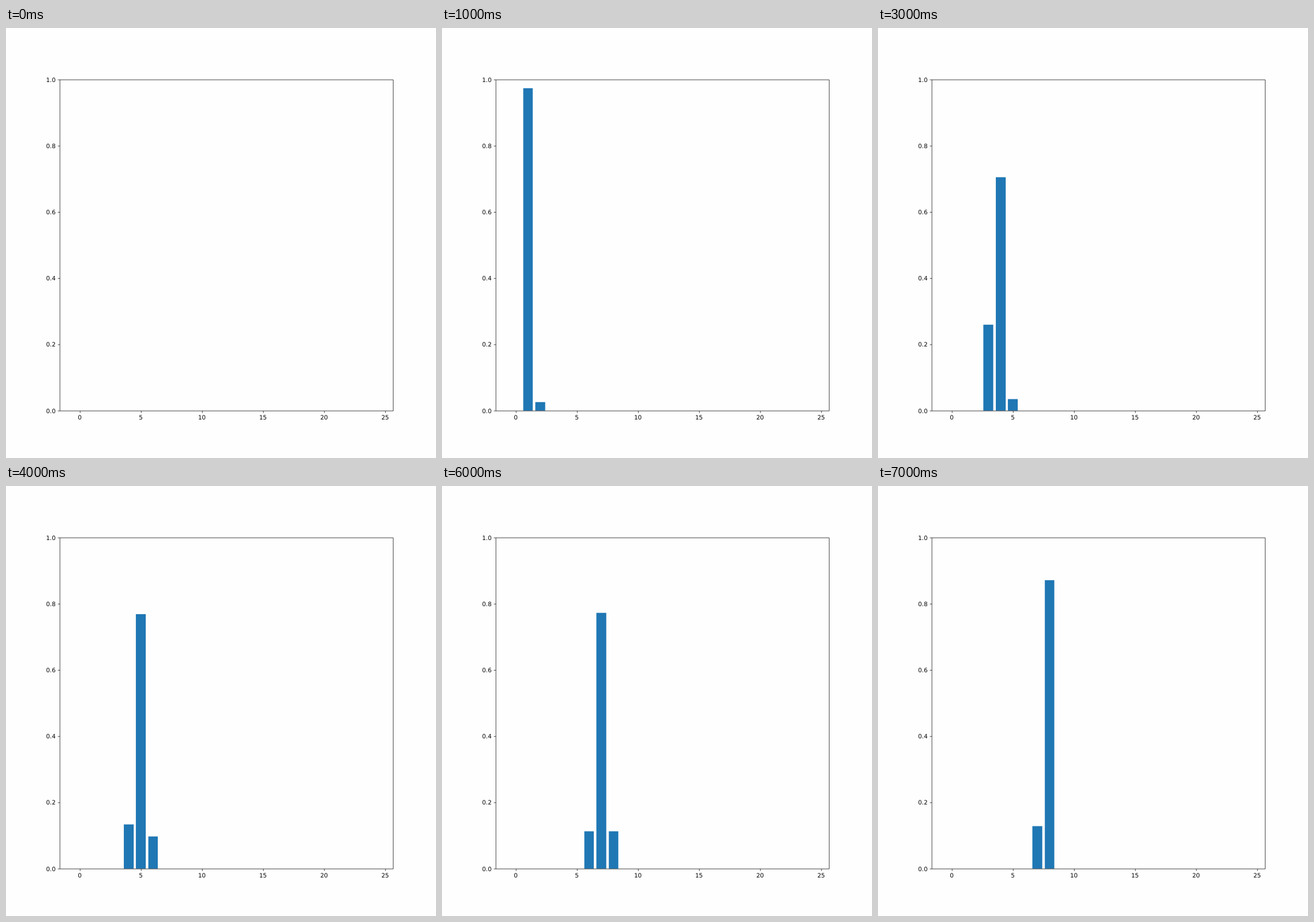
An HTML page for the animation above (8000 ms loop, 748x748 px).

```html
<!DOCTYPE html>
<html lang="en">
<head>
<meta charset="utf-8">
<title>Probability histogram</title>
<style>
  html, body { margin: 0; width: 100%; height: 100%; overflow: hidden; background: #fefefe; }
  svg { display: block; width: 748px; height: 748px; }
  text { font: 13.89px "DejaVu Sans", sans-serif; text-rendering: geometricPrecision; }
  #bars { fill: #1f77b4; }
  #axes { fill: none; stroke: #000; }
</style>
</head>
<body>
<svg viewBox="0 0 1000 1000">
  <g id="bars"></g>
  <path id="axes"/>
  <g id="labels"></g>
</svg>
<script>
const STEP_MS = 1000;
const LEFT = 125, RIGHT = 900, TOP = 120, BOTTOM = 890;
const TICK = 4.86;

// Each step: index of the first bar, then the heights of consecutive bars
const steps = [
  [0],
  [1, 0.974, 0.026],
  [2, 1],
  [3, 0.26, 0.705, 0.035],
  [4, 0.134, 0.769, 0.097],
  [5, 0.117, 0.773, 0.111],
  [6, 0.1135, 0.773, 0.1135],
  [7, 0.128, 0.872],
];

const $ = id => document.getElementById(id);
const xAt = v => LEFT + (v + 1.64) / 27.28 * (RIGHT - LEFT);
const yAt = v => BOTTOM - v * (BOTTOM - TOP);
const snap = v => Math.round(v) + 0.5;

function label(x, y, anchor, text) {
  return `<text x="${x}" y="${y}" text-anchor="${anchor}">${text}</text>`;
}

function drawAxes() {
  let path = `M${LEFT + 0.5} ${TOP + 0.5}H${RIGHT + 0.5}V${BOTTOM + 0.5}H${LEFT + 0.5}Z`;
  let labels = '';
  for (let i = 0; i <= 5; i++) {
    const x = xAt(i * 5), y = yAt(i / 5);
    path += `M${snap(x)} ${BOTTOM + 0.5}v${TICK}M${LEFT + 0.5} ${snap(y)}h${-TICK}`;
    labels += label(x, 911, 'middle', i * 5);
    labels += label(115.3, y + 5.3, 'end', (i / 5).toFixed(1));
  }
  $('axes').setAttribute('d', path);
  $('labels').innerHTML = labels;
}

function drawBars([first, ...heights]) {
  $('bars').innerHTML = heights.map((h, i) => {
    const x = Math.round(xAt(first + i - 0.4));
    const right = Math.round(xAt(first + i + 0.4));
    const y = Math.round(yAt(h));
    return `<rect x="${x}" y="${y}" width="${right - x}" height="${BOTTOM - y}"/>`;
  }).join('');
}

let shown = -1;
function frame() {
  const step = Math.floor(performance.now() / STEP_MS) % steps.length;
  if (step !== shown) drawBars(steps[shown = step]);
  requestAnimationFrame(frame);
}

drawAxes();
frame();
</script>
</body>
</html>
```
